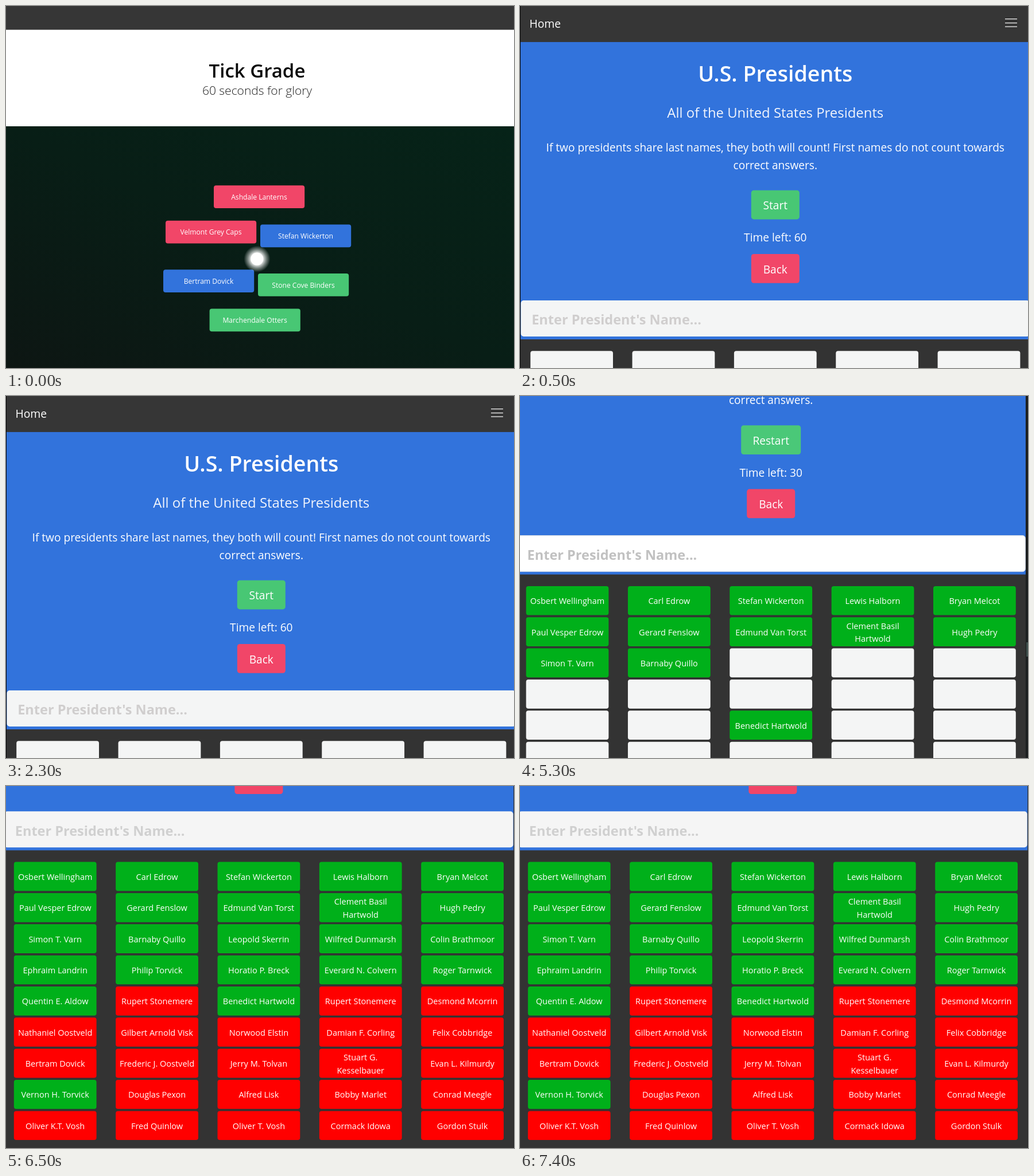
Write an HTML page that moves like this. It is 885x632 px and loops after 8000 ms.

```html
<!DOCTYPE html>
<html lang="en">
<head>
<meta charset="utf-8">
<title>Quiz</title>
<style>
  html, body { margin: 0; width: 100%; height: 100%; overflow: hidden; background: #000; }
  svg { display: block; width: 885px; height: 632px; }
  text { font-family: "Open Sans", "Noto Sans", sans-serif; white-space: pre; }
</style>
</head>
<body>
<svg id="stage" viewBox="0 0 885 632">
  <defs>
    <linearGradient id="night" x1="1" y1="0" x2="0" y2="1">
      <stop offset="0" stop-color="#062318"/>
      <stop offset=".5" stop-color="#081e16"/>
      <stop offset="1" stop-color="#0d1613"/>
    </linearGradient>
    <radialGradient id="glow">
      <stop offset=".45" stop-color="#fff" stop-opacity=".9"/>
      <stop offset=".7" stop-color="#fff" stop-opacity=".45"/>
      <stop offset="1" stop-color="#fff" stop-opacity="0"/>
    </radialGradient>
  </defs>
</svg>
<script>
const BLUE = '#3273dc', GREEN = '#48c774', PINK = '#f14668';
const DARK = '#333333', PALE = '#f4f5f5', RIGHT = '#00b01a', WRONG = '#ff0000';
const LOOP = 8000;

const names = [
  'Osbert Wellingham', 'Carl Edrow', 'Stefan Wickerton', 'Lewis Halborn', 'Bryan Melcot',
  'Paul Vesper Edrow', 'Gerard Fenslow', 'Edmund Van Torst', 'Clement Basil|Hartwold', 'Hugh Pedry',
  'Simon T. Varn', 'Barnaby Quillo', 'Leopold Skerrin', 'Wilfred Dunmarsh', 'Colin Brathmoor',
  'Ephraim Landrin', 'Philip Torvick', 'Horatio P. Breck', 'Everard N. Colvern', 'Roger Tarnwick',
  'Quentin E. Aldow', 'Rupert Stonemere', 'Benedict Hartwold', 'Rupert Stonemere', 'Desmond Mcorrin',
  'Nathaniel Oostveld', 'Gilbert Arnold Visk', 'Norwood Elstin', 'Damian F. Corling', 'Felix Cobbridge',
  'Bertram Dovick', 'Frederic J. Oostveld', 'Jerry M. Tolvan', 'Stuart G.|Kesselbauer', 'Evan L. Kilmurdy',
  'Vernon H. Torvick', 'Douglas Pexon', 'Alfred Lisk', 'Bobby Marlet', 'Conrad Meegle',
  'Oliver K.T. Vosh', 'Fred Quinlow', 'Oliver T. Vosh', 'Cormack Idowa', 'Gordon Stulk'
];

const stage = document.getElementById('stage');

function add(parent, tag, attrs) {
  const el = document.createElementNS('http://www.w3.org/2000/svg', tag);
  for (const key in attrs) el.setAttribute(key, attrs[key]);
  return parent.appendChild(el);
}

function box(parent, x, y, width, height, fill, rx = 0) {
  return add(parent, 'rect', { x, y, width, height, fill, rx });
}

function label(parent, str, x, y, size, fill = '#fff', weight = 450, anchor = 'middle') {
  const el = add(parent, 'text', {
    x, y, fill, 'font-size': size, 'font-weight': weight, 'text-anchor': anchor
  });
  el.textContent = str;
}

function button(parent, str, cx, y, width, fill) {
  box(parent, cx - width / 2, y, width, 50.7, fill, 4.5);
  label(parent, str, cx, y + 33.7, 19.1);
}

function home() {
  const g = add(stage, 'g', {});
  box(g, 0, 0, 885, 42, '#363636');
  box(g, 0, 41.5, 885, 169, '#fff');
  box(g, 0, 210, 885, 422, 'url(#night)');
  label(g, 'Tick Grade', 437.5, 125, 33, '#0a0a0a', 600);
  label(g, '60 seconds for glory', 437.5, 155, 21, '#222', 300);
  const links = [
    ['Ashdale Lanterns', 362, 313.3, PINK],
    ['Velmont Grey Caps', 278, 374.8, PINK],
    [names[2], 443, 381.5, BLUE],
    [names[30], 274, 460.2, BLUE],
    ['Stone Cove Binders', 439, 467, GREEN],
    ['Marchendale Otters', 354.6, 528.5, GREEN]
  ];
  for (const [str, x, y, fill] of links) {
    box(g, x, y, 158.2, 39.8, fill, 4);
    label(g, str, x + 79, y + 24.6, 12.1);
  }
  add(g, 'circle', { cx: 437.3, cy: 441.6, r: 23, fill: 'url(#glow)' });
  add(g, 'circle', { cx: 437.3, cy: 441.6, r: 11, fill: '#fff' });
  return g;
}

function tile(parent, i, state) {
  const x = 18.2 + (i % 5) * 177.35, y = 602.3 + Math.floor(i / 5) * 54.35;
  box(parent, x, y, 143.8, 50.7, state || PALE, 4);
  if (!state) return;
  const lines = names[i].split('|');
  lines.forEach((line, n) =>
    label(parent, line, x + 71.9, y + (lines.length > 1 ? 20.3 + n * 22.7 : 31.3), 14.5));
}

// One quiz page, scrolled by (dx, dy)
function quiz({ dx, dy, action, wide, go, left, field, hint, edge, state }) {
  const g = add(stage, 'g', {});
  box(g, 0, 0, 885, 632, edge);
  const page = add(g, 'g', { transform: `translate(${dx} ${dy})` });
  const mid = 444.8;
  box(page, 1, 0, 887.5, 1200, DARK);
  box(page, 1, 62.7, 887.5, 519.3, BLUE);
  box(page, 1, 0, 887.5, 62.7, '#363636');
  label(page, 'Home', 16.5, 38, 19.3, '#fff', 450, 'start');
  for (const y of [22, 29, 35.5]) box(page, 845, y, 21, 1.2, '#fff');
  label(page, 'U.S. Presidents', mid, 132, 37.6, '#fff', 600);
  label(page, 'All of the United States Presidents', mid, 194.5, 23.9, '#f2f5fc');
  label(page, 'If two presidents share last names, they both will count! First names do not count towards',
    mid, 254, 19.12);
  label(page, 'correct answers.', mid, 284.7, 19.12);
  button(page, action, mid, 321.7, wide, go);
  label(page, 'Time left: ' + left, mid, 411, 19.1);
  button(page, 'Back', mid, 433, 84, PINK);
  const input = box(page, 1.5, 514, 886.5, 63, field, 5);
  if (field === '#fff') input.setAttribute('stroke', '#d5d9e2');
  label(page, "Enter President's Name...", 20.2, 556.3, 23.5, hint, 700, 'start');
  names.forEach((_, i) => tile(page, i, state(i)));
  return g;
}

const halfway = quiz({
  dx: -7.6, dy: -270.4, action: 'Restart', wide: 104, go: '#4ac878', left: 30,
  field: '#fff', hint: '#c1c1c1', edge: '#1c1f20',
  state: i => i < 12 || i === 22 ? RIGHT : null
});
box(halfway, 882, 430, 3, 25, '#3f504d');

const views = [
  { from: 0, el: home() },
  { from: 500, el: quiz({
    dx: 0, dy: 0, action: 'Start', wide: 84, go: GREEN, left: 60,
    field: PALE, hint: '#d0cece', edge: '#000', state: () => null
  }) },
  { from: 3500, el: halfway },
  { from: 6500, el: quiz({
    dx: -4.4, dy: -469.7, action: 'Restart', wide: 104, go: GREEN, left: 0,
    field: '#f5f5f5', hint: '#d0d0d0', edge: '#222',
    state: i => i < 21 || i === 22 || i === 35 ? RIGHT : WRONG
  }) }
];

function draw() {
  const t = performance.now() % LOOP;
  const shown = views.findLast(v => t >= v.from);
  for (const v of views) v.el.style.display = v === shown ? '' : 'none';
  requestAnimationFrame(draw);
}
draw();
</script>
</body>
</html>
```
